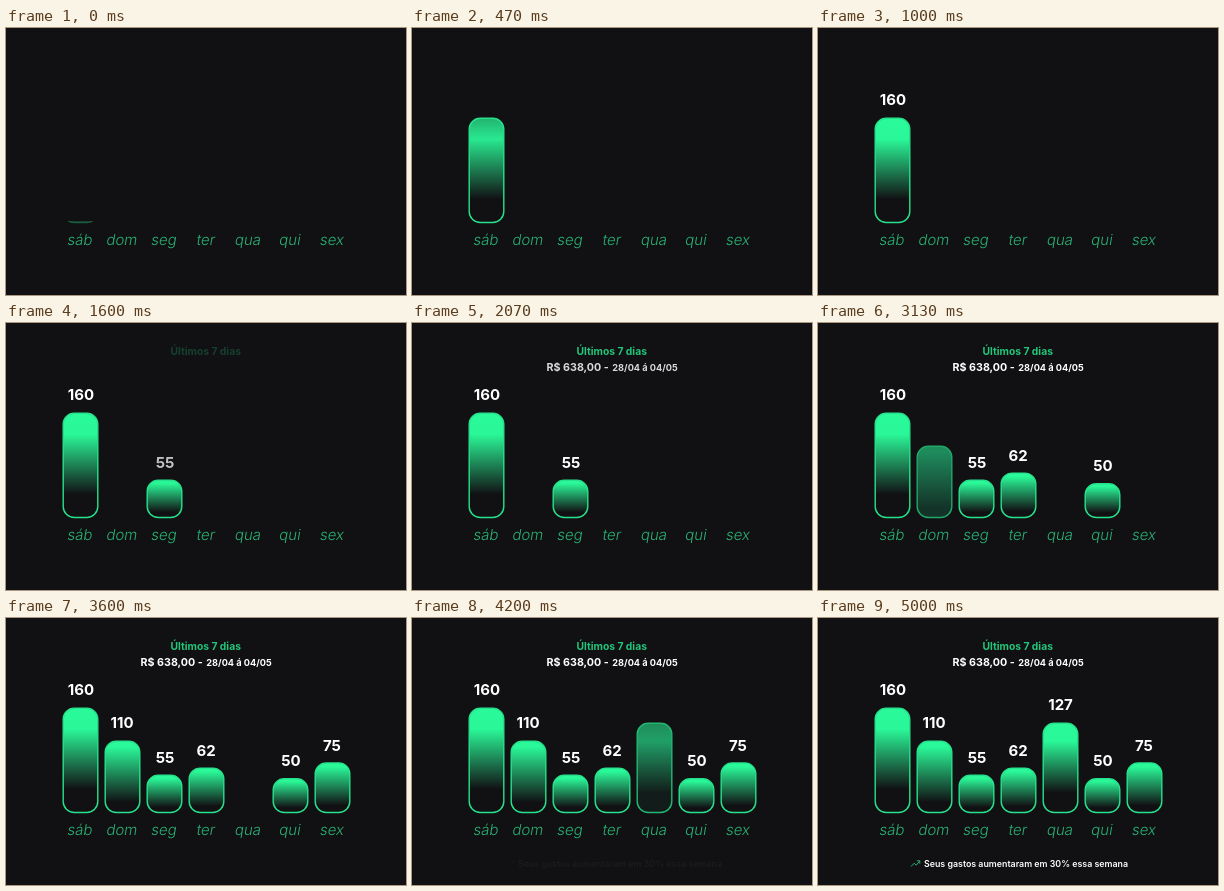
These frames come from a looping animation (400x267 px, 8000 ms). An HTML page:

```html
<!DOCTYPE html>
<html lang="pt">
<head>
<meta charset="utf-8">
<title>Últimos 7 dias</title>
<style>
  html, body { margin: 0; width: 100%; height: 100%; overflow: hidden; background: #111013; }
  svg { display: block; width: 100%; height: 100%; font-family: Inter, sans-serif; }
  .day { font-size: 15px; font-weight: 300; fill: #29b274; text-anchor: middle; }
  .value { font-size: 15px; font-weight: 700; fill: #fff; text-anchor: middle; }
  .bar { stroke: #27e28c; stroke-width: 1.4; }
  #title { font-size: 10.3px; font-weight: 700; fill: #22c77b; text-anchor: middle; animation: title 8s infinite; }
  #total { font-weight: 700; fill: #fff; animation: total 8s infinite; }
  #note { font-size: 8.83px; font-weight: 600; fill: #fff; animation: note 8s infinite; }
  #title, #total, #note { animation-timing-function: linear; }
  @keyframes title { 0%, 19.1% { opacity: 0 } 22.6%, 100% { opacity: 1 } }
  @keyframes total { 0%, 21.9% { opacity: 0 } 26.6%, 100% { opacity: 1 } }
  @keyframes note { 0%, 52.1% { opacity: 0 } 62.5%, 100% { opacity: 1 } }
</style>
</head>
<body>
<svg id="stage" viewBox="0 0 400 267">
  <rect width="400" height="267" fill="#111013"/>
  <text id="title" x="199.7" y="31.5">Últimos 7 dias</text>
  <g id="total">
    <text x="134.5" y="48" font-size="10.7">R$ 638,00 -</text>
    <text x="200.3" y="48" font-size="9.2">28/04 á 04/05</text>
  </g>
  <g id="note">
    <path d="M93 248.5L96.2 245.2L98.2 247.2L101.7 243M98.8 242.8H101.8V245.8" fill="none" stroke="#27b071"/>
    <text x="106" y="248.5">Seus gastos aumentaram em 30% essa semana</text>
  </g>
</svg>
<script>
const LOOP = 8000, BOTTOM = 194.5, TALL = 85;
const stage = document.getElementById('stage');

// top edge, value position, entry start and entry length in ms
const bars = [
  { day: 'sáb', value: 160, top: 90.2, x: 75, y: 77.3, start: 0, span: 730 },
  { day: 'dom', value: 110, top: 123.2, x: 116, y: 110.3, start: 2830, span: 700 },
  { day: 'seg', value: 55, top: 157.3, x: 159, y: 144.5, start: 1280, span: 350 },
  { day: 'ter', value: 62, top: 150.1, x: 200, y: 138.3, start: 2170, span: 330 },
  { day: 'qua', value: 127, top: 105.3, x: 242.5, y: 92.3, start: 3820, span: 800 },
  { day: 'qui', value: 50, top: 160.7, x: 285, y: 148, start: 2170, span: 295 },
  { day: 'sex', value: 75, top: 144.9, x: 326, y: 133, start: 3150, span: 430 }
];

function add(parent, tag, attrs, text = '') {
  const el = document.createElementNS('http://www.w3.org/2000/svg', tag);
  for (const key in attrs) el.setAttribute(key, attrs[key]);
  el.textContent = text;
  return parent.appendChild(el);
}

// Moves one property between two values over a part of the bar's entry.
function tween(el, bar, prop, [from, to], a, b, easing = 'linear') {
  const at = p => (bar.start + p * bar.span) / LOOP;
  el.animate([
    { offset: 0, [prop]: from },
    { offset: at(a), [prop]: from, easing },
    { offset: at(b), [prop]: to },
    { offset: 1, [prop]: to }
  ], { duration: LOOP, iterations: Infinity });
}

bars.forEach((bar, i) => {
  const height = BOTTOM - bar.top;
  const [bright, dark] = height > TALL ? [0.2, 0.78] : [0.08, 0.86];
  const gradient = add(stage, 'linearGradient', { id: 'fill' + i, x1: 0, y1: 0, x2: 0, y2: 1 });
  const stop = (offset, colors, a, b) =>
    tween(add(gradient, 'stop', { offset, 'stop-color': colors[1] }), bar, 'stopColor', colors, a, b);
  stop(0, ['#1f8c5a', '#2afa9a'], 0.48, 0.95);
  stop(bright, ['#1e875a', '#2af898'], 0.42, 0.68);
  stop(dark, ['#16523b', '#111013'], 0.37, 0.5);

  const rect = add(stage, 'rect', {
    class: 'bar', x: 57.2 + 42 * i, y: bar.top, width: 34.6, height, rx: 11, fill: `url(#fill${i})`
  });
  tween(rect, bar, 'clipPath', [`inset(${height + 0.2}px -2px -2px -2px)`, 'inset(-2px)'], 0, 0.4, 'ease-out');
  tween(rect, bar, 'stroke', ['#1f8f5c', '#27e28c'], 0.36, 0.6);
  tween(rect, bar, 'opacity', [bar.start ? 0 : 0.6, 1], 0, 0.1);

  const value = add(stage, 'text', { class: 'value', x: bar.x, y: bar.y }, bar.value);
  tween(value, bar, 'opacity', [0, 1], 0.68, 1);
  // Skewed upright letters keep the two-storey a.
  add(stage, 'text', { class: 'day', transform: `translate(${73.2 + 42 * i} 217.3) skewX(-9.4)` }, bar.day);
});
</script>
</body>
</html>
```
